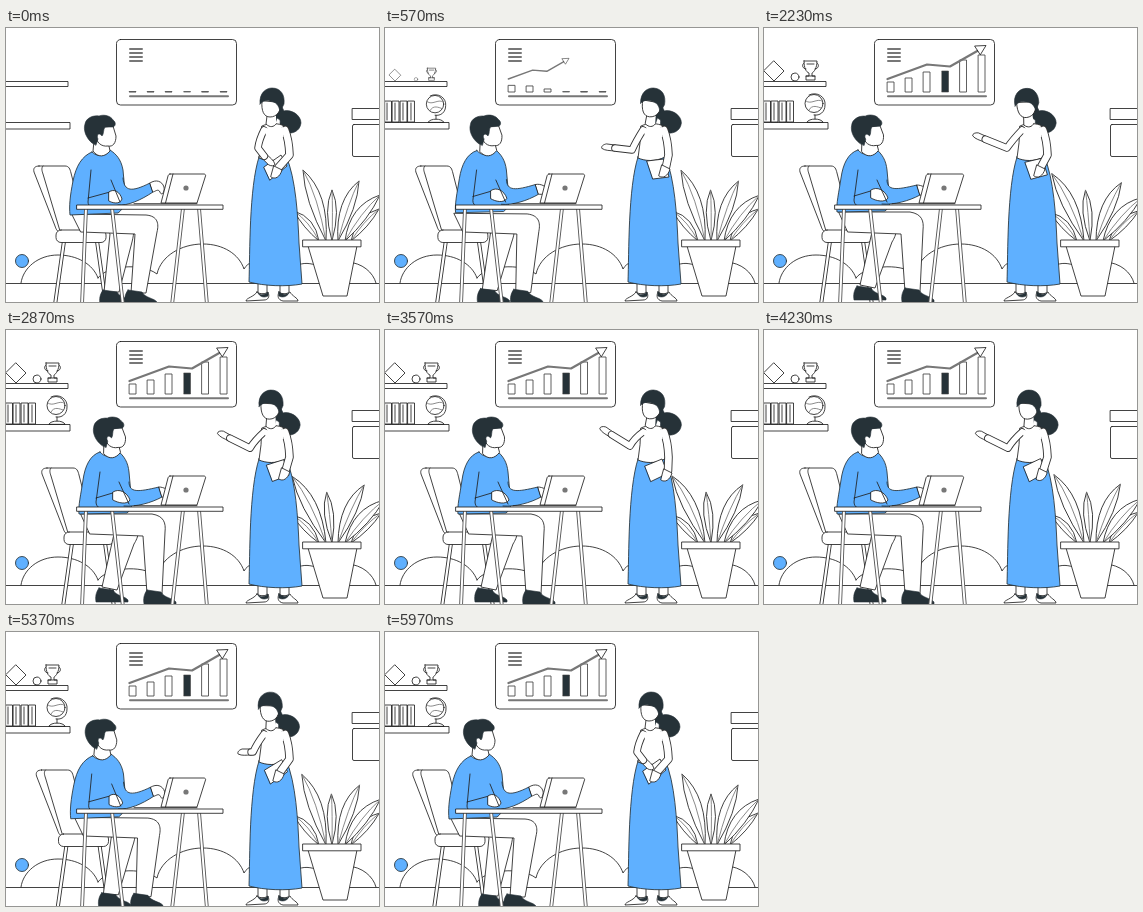
An HTML page for the animation above (6.01 s loop, 373 by 274 pixels).

```html
<!DOCTYPE html>
<html lang="en">
<head>
<meta charset="utf-8">
<title>Chart presentation</title>
<style>
html, body { margin: 0; width: 100%; height: 100%; overflow: hidden; background: #fff; }
svg { display: block; width: 100vw; height: 100vh; }
svg * { stroke-linejoin: round; stroke-linecap: round; }
.o { fill: #fff; stroke: #222; stroke-width: .85; }
.l { fill: none; stroke: #222; stroke-width: .85; }
.g { fill: none; stroke: #777; stroke-width: .85; }
.b { fill: #5fb0ff; stroke: #263238; stroke-width: .85; }
.d { fill: #263238; stroke: #263238; stroke-width: .6; }
.w { fill: #fff; }
</style>
</head>
<body>
<svg id="stage" viewBox="0 0 373 274"></svg>
<script>
const LOOP = 6010;
const path = (cls, d, id = '') => `<path class="${cls}" d="${d}" id="${id}"/>`;
const rect = (x, y, w, h, r = 0, cls = 'o') =>
  `<rect class="${cls}" x="${x}" y="${y}" width="${w}" height="${h}" rx="${r}"/>`;
const disc = (x, y, r, cls = 'o') => `<circle class="${cls}" cx="${x}" cy="${y}" r="${r}"/>`;
const group = (id, body) => `<g id="${id}">${body}</g>`;
// A limb or leg: a thick line with a lighter core.
const tube = (d, w, id = '', edge = '#333') =>
  `<path d="${d}" id="${id}" fill="none" stroke="${edge}" stroke-width="${w}"/>` +
  `<path d="${d}" id="${id && id + 'Core'}" fill="none" stroke="#fff" stroke-width="${w - 1.8}"/>`;

const clamp = v => Math.max(0, Math.min(1, v));
const part = (t, from, to) => clamp((t - from) / (to - from));
const out = p => 1 - (1 - p) * (1 - p);
const inOut = p => p < .5 ? 2 * p * p : 1 - 2 * (1 - p) * (1 - p);
const smooth = p => p * p * (3 - 2 * p);
const lerp = (a, b, p) => a + (b - a) * p;

// Blends two path strings of the same structure.
function blend(a, b, p) {
  const to = b.match(/-?[\d.]+/g);
  let i = 0;
  return a.replace(/-?[\d.]+/g, n => lerp(+n, +to[i++], p).toFixed(2));
}

// Bars: x, top, start
const BAR_TIME = 950;
const bars = [
  [123.5, 54, 10], [141.5, 50, 130], [159.5, 44, 310],
  [178, 43, 675], [196, 32, 925], [214.5, 27, 1020]
];

// Shelf items: pivot x, pivot y, start, end, drawing
const items = [
  [10, 53, 150, 1350, path('o', 'M10 33 L20 43 L10 53 L0 43Z')],
  [31, 53, 300, 1400, disc(31, 49, 4)],
  [46.5, 53, 50, 1350, path('o', 'M40 33 H53 C53 40 50 44 48 45 V48 H51 V52 H42 V48 H45 V45 C42 44 40 40 40 33Z') +
    path('l', 'M40 35 C37 37 39 41 42 41 M53 35 C56 37 54 41 51 41 M42 48 H51 M43 36 H50')],
  [15, 94, 0, 600, [0, 7.5, 15.5, 23].map(x => rect(x, 73, 6.5, 21, 0)).join('') +
    path('l', 'M2 75 V92 M10 75 V92 M18 75 V92 M26 75 V92')],
  [51, 94, 0, 700, disc(50, 75.5, 9) + path('l', 'M45 67 C53 63 62 69 61 77 C61 84 56 88 50 87 M51 87 V91 M43 94 C45 90 57 90 59 94Z') +
    path('g', 'M42 73 C47 77 53 70 58 73 M45 82 C48 76 54 79 57 80')]
];

// Leaves: base x, tip x, tip y, width, swing in degrees
const leaves = [
  [313, 288, 183, 8, 2], [345, 373, 181, 9, -2], [326, 326, 162, 9, 3],
  [320, 297, 142, 13, 4.5], [339, 374, 167, 12, -2.5], [332, 353, 153, 12, -2.5]
];
// Sides leave the pot steeply and arch outwards.
function leaf([x, tx, ty, w]) {
  const mx = lerp(x, tx, .4), my = lerp(213, ty, .62);
  const len = Math.hypot(tx - x, ty - 213);
  const nx = (213 - ty) / len * w, ny = (tx - x) / len * w;
  return path('o', `M${x} 213 Q${mx - nx} ${my - ny} ${tx} ${ty} Q${mx + nx} ${my + ny} ${x} 213Z`) +
    path('g', `M${x} 213 Q${mx + nx * .1} ${my + ny * .1} ${tx} ${ty}`);
}

// Each pair: seated back, then leaning in.
const poses = {
  legFar: ['M86 190 L122 190 C130 194 128 206 126 214 L113 264 L98 264 L104 206Z',
    'M90 190 L128 190 C136 196 132 208 128 214 L111 260 L96 257 L108 204Z'],
  legNear: ['M66 186 L140 187 C152 188 153 196 151 204 L140 265 L125 265 L129 206 L75 204Z',
    'M75 184 L146 184 C158 186 160 193 159 202 L156 264 L141 264 L137 206 L84 204Z'],
  torso: ['M86 124 C76 128 70 138 67 153 C64 168 63 178 64 187 L112 185 C118 181 120 172 119 164 L117 142 C115 131 110 126 104 122 C98 129 91 129 86 124Z',
    'M94 122 C84 125 79 136 77 150 C75 164 72 176 73 184 L121 183 C127 179 127 170 125 164 L123 142 C122 132 118 126 112 121 C106 128 99 128 94 122Z'],
  sleeve: ['M117 150 C118 164 126 164 144 155 L147 164 C135 172 122 178 112 177',
    'M123 152 C123 163 132 162 153 157 L156 167 C145 173 130 177 118 176'],
  palm: ['M144 155 C150 151 156 153 158 159 C159 165 155 168 154 164 C152 160 149 164 147 164Z',
    'M153 157 C158 157 163 160 165 164 C166 170 162 171 160 169 C159 167 158 168 156 167Z'],
  crease: ['M85 142 L82 174 C82 179 88 181 95 180 M82 170 L104 164',
    'M94 142 L90 172 C90 178 96 180 103 179 M90 168 L110 162'],
  fist: ['M103 164 C108 160 114 164 116 171 C114 177 106 175 103 173Z',
    'M107 162 C113 158 121 162 124 170 C121 175 112 173 107 170Z'],
  pen: ['M105 152 L114 174', 'M113 152 L123 174']
};
const shoe = 'M0 0 L14 2 C17 8 26 8 29 12 V14 H-3 C-4 9 -3 4 0 0Z';
const clutch = ['M258 139 L275 127 L281 138 L264 152Z', 'M262 133 L279 131 L284 149 L268 151Z'];

// Time, head shift, elbow x y, hand x y, clutch blend, other hand x y
const woman = [
  [0, 0, 250, 120, 264, 134, 0, 268, 147],
  [570, 2, 245, 122, 222, 119, 1, 277, 146],
  [1370, 2, 243, 118, 225, 97, 1, 276, 146],
  [2230, -4, 241, 120, 214, 108, .8, 273, 146],
  [3570, 2, 243, 116, 220, 100, .5, 279, 148],
  [4830, -4, 241, 120, 214, 108, .3, 272, 147],
  [5970, 0, 250, 120, 264, 134, 0, 268, 147],
  [LOOP, 0, 250, 120, 264, 134, 0, 268, 147]
];

const scenery =
  path('l', 'M15 255 C17 240 32 227 52 227 C71 227 87 236 92 250') +
  path('l', 'M92 250 C100 238 135 234 151 246 C155 228 175 216 197 216 C217 216 233 226 238 241 C242 234 250 232 256 232') +
  path('l', 'M290 238 C297 234 305 235 312 238 M342 234 C356 235 367 244 370 255') +
  path('l', 'M0 255.5 H373') + disc(16, 233, 6.5, 'b') +
  rect(346.5, 80.5, 30, 11) + rect(346.5, 96.5, 30, 32, 1.5) +
  rect(-3, 53.5, 65, 5) + rect(-3, 94.5, 67, 6.5);

const board = rect(110.5, 11.5, 120, 65.5, 4) +
  '<path d="M124 21H136M124 25H136M124 29H136M124 33H136M124 68.3H222" fill="none" stroke="#777" stroke-width="2"/>' +
  bars.map((b, i) => `<rect id="bar${i}" class="${i === 3 ? 'd' : 'o'}" x="${b[0]}" width="6.5" style="stroke:#444"/>`).join('') +
  group('arrow', '<path d="M123.5 51 L163 36.5 L186 38.5 L215 22" fill="none" stroke="#777" stroke-width="2.2"/>' +
    path('o', 'M211 18 L222 17.5 L216.5 26.5Z'));

const chair = group('chair', tube('M66 213 L57 277', 4) + tube('M99 213 L108 277', 4) +
  path('o', 'M41 138 H67 C71 138 72 141 73 145 L88 204 H63 C59 204 58 201 57 198 L36 144 C35 140 37 138 41 138Z') +
  path('l', 'M45 138 C43 140 44 143 45 146 L62 203') + rect(58, 202, 50, 12.5, 5));

const manHead = path('w', 'M88 110 L87 123 C92 130 99 129 104 123 L103 115Z') +
  path('l', 'M88 113 L87 123 C92 130 99 129 104 123 L103 118') +
  path('o', 'M91 100 L107 98 L110 108 C110 115 107 119 102 118 C95 119 90 114 90 108Z') +
  path('d', 'M86 115 C80 110 77 102 79 96 C80 90 87 87 93 88 C98 86 105 88 107 92 C110 94 110 98 107 99 L99 99 C97 102 98 106 96 108 C93 104 90 107 92 111 L90 117Z');

const man = path('o', '', 'legFar') + path('d', shoe, 'shoeFar') + path('o', '', 'legNear') + path('d', shoe, 'shoeNear') +
  path('b', '', 'torso') + group('manHead', manHead) + path('b', '', 'sleeve') + path('o', '', 'palm') +
  path('l', '', 'crease') + path('o', '', 'fist') + path('l', '', 'pen');

const desk = ['M80 180 L76 277', 'M106 180 L117 277', 'M177 180 L166 277', 'M193 180 L201 277']
  .map(d => tube(d, 3.8, '', '#555')).join('') + rect(71, 177, 146, 4.3) +
  path('o', 'M164 146 H198 C199 146 200 147 199.5 148 L191 175 H155 L162 148 C162.3 147 163 146 164 146Z') +
  path('l', 'M159.5 175 L167 146 M128 175.7 H191') + '<circle cx="180" cy="160" r="2.6" fill="#777"/>';

const plant = leaves.map((l, i) => group('leaf' + i, leaf(l))).join('') +
  path('o', 'M302 218 L317 268 H341 L351 218Z') + rect(297, 212, 58, 6.8);

const lady = path('o', 'M252 254 V266 H261 V254Z M274 254 V266 H283 V254Z') +
  path('o', 'M251 264 C255 267 259 266 262 264 C264 269 262 272 258 272 L240 273 C240 270 248 269 251 264Z') +
  path('o', 'M273 264 C277 267 280 266 284 264 C286 268 292 270 292 273 H277 C272 272 271 268 273 264Z') +
  path('d', 'M252 265 C255 268 259 267 262 264 L262 268 C258 270 254 269 252 265Z M273 264 C277 267 280 267 283 265 C281 269 276 270 273 268Z') +
  path('b', 'M253 129 C260 133 273 133 280 128 C290 150 292 190 293 215 L296 256 C280 259 258 258 243 254 C244 225 243 160 253 129Z') +
  group('ladyHead', path('d', 'M274 75 L278 83 C285 81 295 87 295 95 C294 104 285 107 277 104 C271 101 275 97 274 92 L271 90 L269 96 L267 90Z')) +
  path('o', 'M256 98 C262 95 270 95 276 97 C281 99 284 105 283 112 L280 129 C270 134 260 133 253 130 L255 115Z') +
  group('ladyFace', path('w', 'M261 84 L260 96 C264 100 268 99 270 96 L270 84Z') +
    path('l', 'M261 88 L260 96 C264 100 268 99 270 96') +
    path('o', 'M256 73 C255 83 258 89 264 89 C271 89 275 83 275 75Z') +
    path('d', 'M254 76 C253 65 260 60 266 60 C275 60 279 67 278 76 L274 84 C273 77 270 74 264 73 C260 72 257 73 254 76Z')) +
  path('o', '', 'clutch') + tube('', 8.5, 'armBack') + path('o', '', 'handBack') +
  path('o', '', 'hand') + tube('', 7.5, 'arm') + path('w', 'M257 99 C263 101 270 101 277 99 L277.5 109 L261 110Z');

const stage = document.getElementById('stage');
stage.innerHTML = scenery + items.map((it, i) => group('item' + i, it[4])).join('') +
  board + chair + man + desk + plant + lady;

const el = {};
stage.querySelectorAll('[id]').forEach(n => { if (n.id) el[n.id] = n; });
const set = (id, d) => el[id].setAttribute('d', d);
const move = (id, v) => el[id].setAttribute('transform', v);
const setTube = (id, d) => { set(id, d); set(id + 'Core', d); };

function grow(id, x, y, s) {
  move(id, `translate(${x} ${y}) scale(${s}) translate(${-x} ${-y})`);
  el[id].style.display = s < .02 ? 'none' : '';
}

function sample(rows, t) {
  let i = 0;
  while (i < rows.length - 2 && t >= rows[i + 1][0]) i++;
  const p = smooth(part(t, rows[i][0], rows[i + 1][0]));
  return rows[i].map((v, k) => lerp(v, rows[i + 1][k], p));
}

function drawRoom(t) {
  items.forEach(([x, y, from, to], i) => grow('item' + i, x, y, out(part(t, from, to))));
  bars.forEach(([, top, from], i) => {
    const h = Math.max(.4, (64 - top) * inOut(part(t, from, from + BAR_TIME)));
    el['bar' + i].setAttribute('y', 64 - h);
    el['bar' + i].setAttribute('height', h);
  });
  grow('arrow', 123, 51, out(part(t, 0, 1500)));
  const sway = (1 - Math.cos(t / LOOP * 2 * Math.PI)) / 2;
  leaves.forEach((l, i) => move('leaf' + i, `rotate(${-l[4] * 2 * sway} ${l[0]} 213)`));
}

function drawMan(t) {
  const seat = inOut(part(t, 0, 1350)) - inOut(part(t, 4470, 5960));
  const lean = inOut(part(t, 0, 900)) - inOut(part(t, 4470, 5600));
  for (const id in poses) set(id, blend(...poses[id], id.startsWith('leg') ? seat : lean));
  move('chair', `translate(${-8 * (1 - seat)} 0)`);
  move('shoeFar', `translate(${lerp(97, 93, seat)} ${lerp(262, 258, seat)})`);
  move('shoeNear', `translate(${lerp(122, 141, seat)} ${lerp(262, 260, seat)})`);
  move('manHead', `translate(${10 * lean} 0) rotate(${-4 * lean} 94 115)`);
}

function drawLady(t) {
  const [, dx, ex, ey, hx, hy, q, bx, by] = sample(woman, t);
  move('ladyHead', `translate(${dx * .7} 0)`);
  move('ladyFace', `rotate(${dx * 2} 267 98)`);
  set('clutch', blend(...clutch, q));
  setTube('armBack', `M279 102 Q283 112 283.5 127 L${bx + 4} ${by - 7}`);
  set('handBack', `M${bx} ${by - 9} L${bx + 8} ${by - 5} C${bx + 6} ${by + 2} ${bx + 1} ${by + 5} ${bx - 3} ${by + 2}Z`);
  // The sleeve stops short of the hand, which points along the forearm.
  const len = Math.hypot(hx - ex, hy - ey), ux = (hx - ex) / len, uy = (hy - ey) / len;
  const at = (f, s) => `${(hx + ux * f - uy * s).toFixed(2)} ${(hy + uy * f + ux * s).toFixed(2)}`;
  setTube('arm', `M258 102 Q${(ex + 256) / 2} ${ey - 8} ${ex + 2} ${ey} L${at(-8, 0)}`);
  set('hand', `M${at(-8, -3)} C${at(-3, -3)} ${at(1, -4)} ${at(5, -2)} C${at(6, 0)} ${at(4, 2)} ${at(1, 3)} L${at(-8, 3)}Z`);
}

function frame() {
  const t = performance.now() % LOOP;
  drawRoom(t);
  drawMan(t);
  drawLady(t);
  requestAnimationFrame(frame);
}
frame();
</script>
</body>
</html>
```
